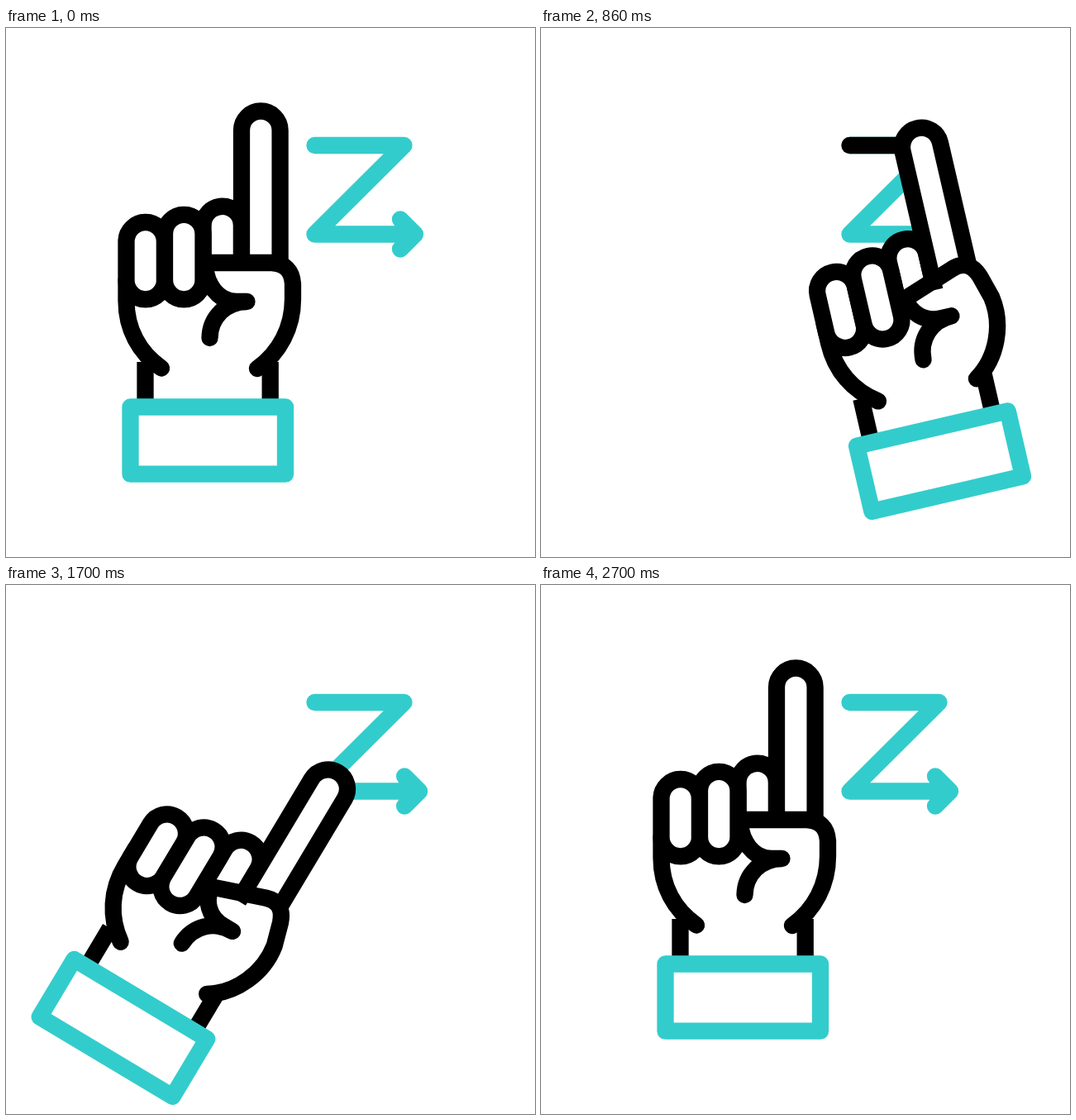
Write an HTML page that moves like this. It is 640x640 px and loops after 3000 ms.

```html
<!DOCTYPE html>
<html lang="en">
<head>
<meta charset="utf-8">
<title>Hand drawing a Z</title>
<style>
  html, body { margin: 0; width: 100%; height: 100%; overflow: hidden; background: #fff; }
  svg { display: block; width: 100%; height: 100%; }
  path, rect { fill: none; stroke: #000; stroke-width: 20.3; stroke-linejoin: round; }
  .round { stroke-linecap: round; }
  .teal { stroke: #33cccc; }
  .solid { fill: #fff; }
  #skin { fill: #fff; stroke: none; }
</style>
</head>
<body>
<svg viewBox="0 0 640 640">
  <path id="zed" class="teal round"/>
  <path id="trail" class="round" d="M373.5 142H481.5L373.5 249.5"/>
  <g id="hand">
    <path id="skin"/>
    <path d="M168.5 404V455M319.7 404V455"/>
    <path class="round" d="M145.5 305V330C145.5 364 161 393 188 411.5"/>
    <g id="fingers">
      <path class="solid" d="M238.5 305V239a23.25 23.25 0 0 1 46.5 0V284"/>
      <rect class="solid" x="145.5" y="235" width="46.5" height="93.3" rx="23.25"/>
      <rect class="solid" x="192" y="225.8" width="46.5" height="102.5" rx="23.25"/>
    </g>
    <path class="solid" d="M285 284V123.8a23.3 23.3 0 0 1 46.6 0V284"/>
    <path id="palm" class="round"/>
    <path id="thumb" class="round"/>
    <rect class="teal solid" x="150.5" y="458.5" width="187.5" height="81.2"/>
  </g>
</svg>
<script>
const LOOP = 3000, TIP_X = 308.3, TIP_Y = 123.8;
const TOP = 108, DIAGONAL = 152.4; // stroke lengths of the Z
const el = id => document.getElementById(id);
const ramp = (t, from, to) => Math.min(1, Math.max(0, (t - from) / (to - from)));

function drawHand(x, y, angle, bend) {
  // a point of the thumb side and how far it drifts when the thumb bends
  const pt = (px, py, dx = 6, dy = 0) => `${px + dx * bend} ${py + dy * bend} `;
  const knuckle = pt(241, 284, 7, 14);

  const palm = `M${knuckle}L${pt(321.5, 284, -9.5, -8.5)}`
    + `Q${pt(345.5, 285.5, -12, -17)}${pt(347, 309.5, -5, -17)}L${pt(347, 328, 3, -8)}`
    + `C${pt(347, 362, 9, -7)}${pt(331, 393, 9)}${pt(304, 412)}`;
  const thumb = `M${knuckle}C${pt(241, 310, 9, 6)}${pt(257, 331)}${pt(279, 331)}`
    + `L${pt(291.5, 331)}C${pt(266, 331)}${pt(247, 350)}${pt(246.5, 375)}`;

  el('palm').setAttribute('d', palm);
  el('thumb').setAttribute('d', thumb);
  el('skin').setAttribute('d', palm + 'L319.7 412V458H168.5V411H188C161 393 145.5 364 145.5 330V290Z');
  el('fingers').setAttribute('transform', `translate(0 ${12 * bend})`);
  el('hand').setAttribute('transform',
    `translate(${x} ${y}) rotate(${angle}) translate(${-TIP_X} ${-TIP_Y})`);
}

function drawZed(stretch, head, tail) {
  const end = 495 + stretch;
  el('zed').setAttribute('d',
    `M373.5 142H481.5L373.5 249.5H${end}M${end - 18} 231.5L${end} 249.5L${end - 18} 267.5`);
  const trail = el('trail').style;
  trail.visibility = head > tail ? 'visible' : 'hidden';
  trail.strokeDasharray = `${Math.max(0, head - tail)} 999`;
  trail.strokeDashoffset = -tail;
}

function draw(t) {
  const reach = ramp(t, 200, 500);
  const across = ramp(t, 500, 930);
  const down = ramp(t, 1100, 1500);
  const out = ramp(t, 1660, 2060);
  const away = (1 - ramp(t, 2060, 2700)) ** 2; // eases home at the end

  drawHand(
    TIP_X + away * (68 * reach + 100 * across - 102 * down + 150 * out),
    TIP_Y + away * (20.2 * reach + 102.7 * down),
    away * (4 * reach - 20.3 * across + 47.2 * down),
    away * ramp(t, 200, 600)
  );
  drawZed(
    50 * (out - ramp(t, 2060, 2370)),
    TOP * across + DIAGONAL * down,
    (TOP + DIAGONAL) * ramp(t, 965, 1685) ** 2
  );
}

const start = performance.now();
function tick() {
  draw((performance.now() - start) % LOOP);
  requestAnimationFrame(tick);
}
tick();
</script>
</body>
</html>
```
